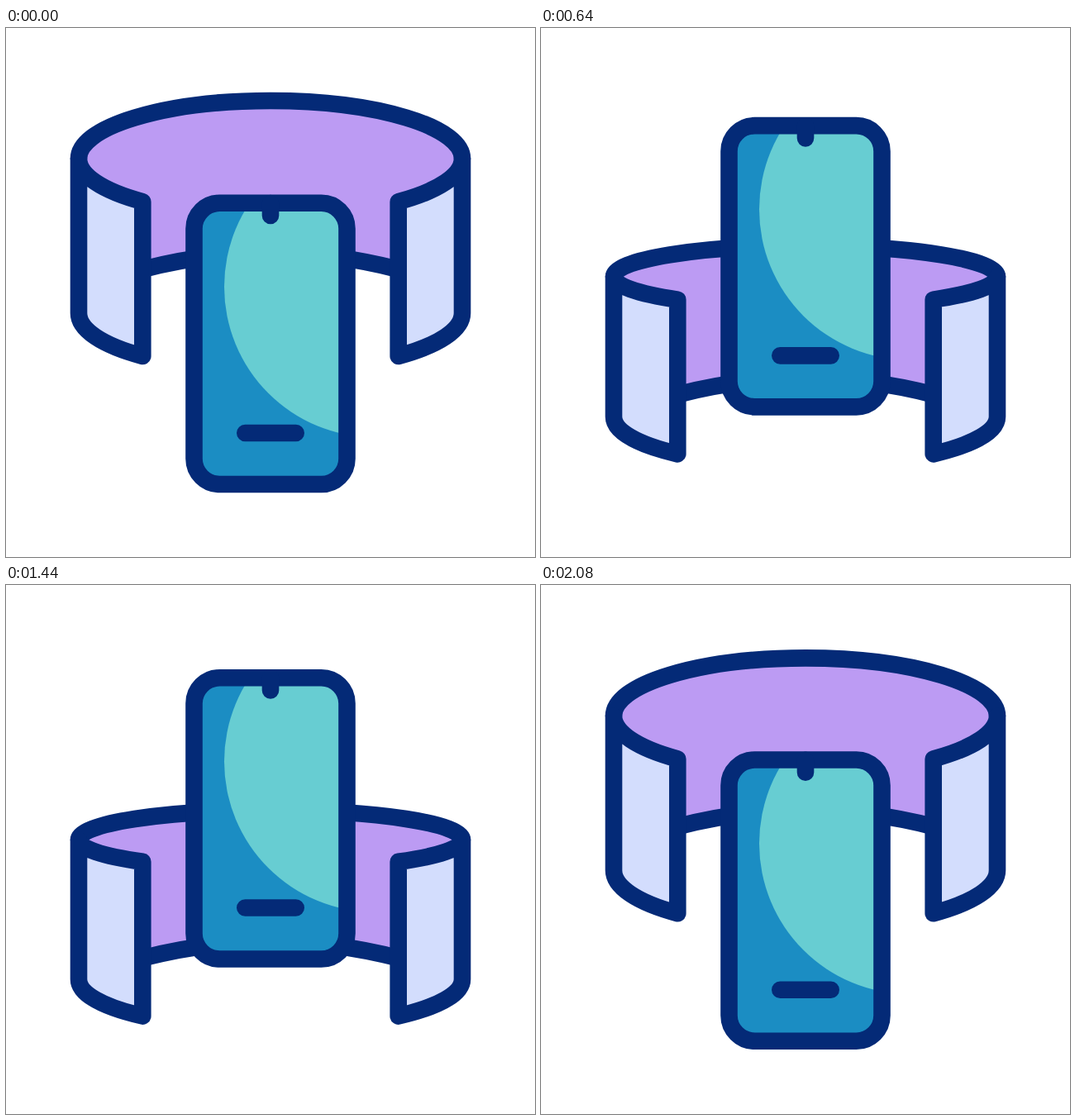
Recreate the animation shown at these times as an HTML page. Size 640 by 640 pixels, loop 2.12 s.

```html
<!DOCTYPE html>
<html lang="en">
<head>
<meta charset="utf-8">
<title>Phone and panorama</title>
<style>
  html, body { margin: 0; width: 100%; height: 100%; overflow: hidden; background: #fff; }
  svg { display: block; width: 100%; height: 100%; }
  .line { fill: none; stroke: #042a77; stroke-width: 20.6; stroke-linecap: round; stroke-linejoin: round; }
  .panel { fill: #d3ddfd; }
</style>
</head>
<body>
<svg viewBox="0 0 640 640">
  <defs>
    <clipPath id="screen"><rect x="227.5" y="211.8" width="185" height="340.2" rx="31"/></clipPath>
  </defs>
  <path id="inside" class="line" style="fill:#bc9bf3;stroke:none"/>
  <path id="rim" class="line"/>
  <path id="leftPanel" class="line panel"/>
  <path id="rightPanel" class="line panel"/>
  <g id="phone">
    <g clip-path="url(#screen)">
      <rect x="227" y="211" width="186" height="342" fill="#1b8dc3"/>
      <circle cx="446.2" cy="313" r="182.2" fill="#67cdd2"/>
    </g>
    <path id="glare" class="line"/>
    <rect class="line" x="227.5" y="211.8" width="185" height="340.2" rx="31"/>
    <path class="line" d="M320 212V227M289.3 490H350.7"/>
  </g>
</svg>
<script>
const LOOP = 2120, STEP = 40;
const RX = 232, EDGE = 154.7;
const EDGE_DROP = Math.sqrt(1 - (EDGE / RX) ** 2);
const el = id => document.getElementById(id);
const clamp = u => Math.min(1, Math.max(0, u));
const mix = (a, b, u) => a + (b - a) * u;
const smooth = u => u * u * (3 - 2 * u);

// Symmetric cubic-bezier(a, 0, 1 - a, 1), solved by bisection.
function ease(a, x) {
  let lo = 0, hi = 1;
  for (let i = 0; i < 30; i++) {
    const t = (lo + hi) / 2, r = 1 - t;
    if (3 * a * t * r * r + 3 * (1 - a) * t * t * r + t ** 3 < x) lo = t; else hi = t;
  }
  return smooth(lo);
}

const thereAndBack = (a, t) =>
  ease(a, clamp((t - 5) / 910)) - ease(a, clamp((t - 1209) / 910));

// Angles in degrees at given times.
const TILT = [[640, 0], [880, 7], [1200, -8.5], [1440, 0]];
function tiltAt(t) {
  for (let i = 1; i < TILT.length; i++) {
    const [t0, a0] = TILT[i - 1], [t1, a1] = TILT[i];
    if (t >= t0 && t < t1) return mix(a0, a1, smooth((t - t0) / (t1 - t0)));
  }
  return 0;
}

function drawRing(p) {
  const y = mix(158, 322, p), ry = mix(70, 32.5, p);
  const edgeTop = y + EDGE_DROP * ry, edgeBottom = mix(397, 533, p);
  const sideBottom = mix(345, 489, p), back = mix(292, 466, p);
  const lowerRy = (edgeBottom - sideBottom) / EDGE_DROP;
  const xl = 320 - EDGE, xr = 320 + EDGE;
  const top = `M88 ${y}A${RX} ${ry} 0 0 1 552 ${y}`;

  el('inside').setAttribute('d', `${top}A${RX} ${ry} 0 0 1 ${xr} ${edgeTop}V${back}` +
    `Q320 ${back - 40} ${xl} ${back}V${edgeTop}A${RX} ${ry} 0 0 1 88 ${y}Z`);
  el('rim').setAttribute('d', `${top}M${xl} ${back}Q320 ${back - 40} ${xr} ${back}`);

  const panel = (side, sweep) => {
    const outer = 320 + side * RX, inner = 320 + side * EDGE;
    return `M${outer} ${y}V${sideBottom}A${RX} ${lowerRy} 0 0 ${sweep} ${inner} ${edgeBottom}` +
      `V${edgeTop}A${RX} ${ry} 0 0 ${1 - sweep} ${outer} ${y}Z`;
  };
  el('leftPanel').setAttribute('d', panel(-1, 0));
  el('rightPanel').setAttribute('d', panel(1, 1));
}

// A 45 degree line sweeping over the screen from corner to corner.
function drawGlare(u) {
  const sum = mix(439, 965, smooth(clamp(u)));
  const x0 = Math.max(227, sum - 552), x1 = Math.min(413, sum - 212);
  const visible = sum > 475 && sum < 929;
  el('glare').setAttribute('d', visible ? `M${x0} ${sum - x0}L${x1} ${sum - x1}` : '');
}

function draw(t) {
  drawRing(thereAndBack(0.6, t));
  drawGlare((t - 715) / 696);
  const lift = -111.4 * thereAndBack(0.51, t);
  el('phone').setAttribute('transform', `translate(0 ${lift}) rotate(${tiltAt(t)} 320 320)`);
}

const start = performance.now();
function frame() {
  const t = (performance.now() - start) % LOOP;
  draw(Math.floor(t / STEP) * STEP);
  requestAnimationFrame(frame);
}
frame();
</script>
</body>
</html>
```
